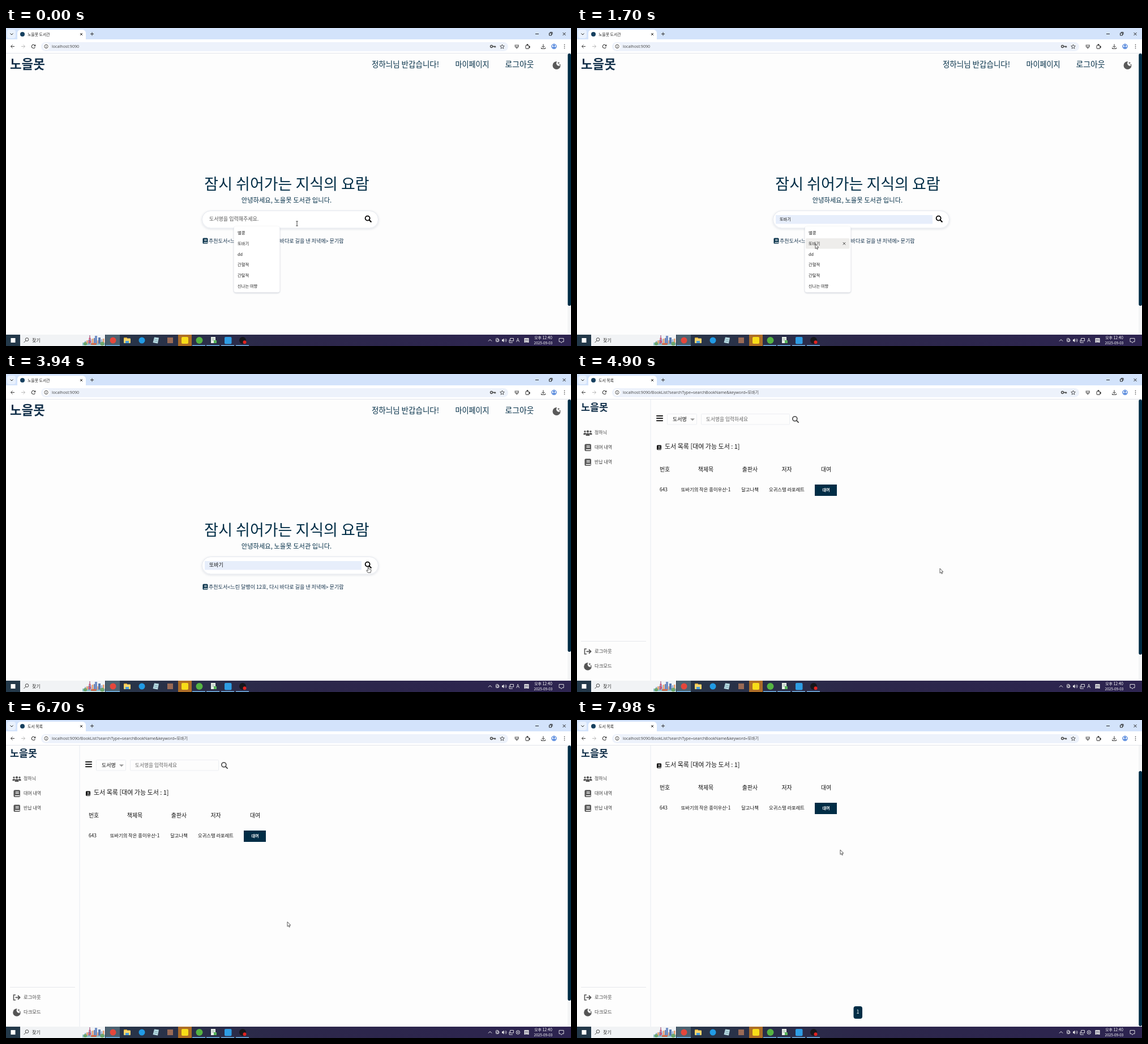
An HTML page with a canvas that plays this animation: 998 by 561 pixels, repeating every 8 s.

```html
<!DOCTYPE html>
<html lang="ko">
<head>
<meta charset="utf-8">
<title>도서관</title>
<style>
  html, body { margin: 0; width: 100%; height: 100%; overflow: hidden; background: #fdfdfd; }
  canvas { display: block; width: 998px; height: 561px; }
</style>
</head>
<body>
<canvas id="stage" width="998" height="561"></canvas>
<script>
const g = document.getElementById('stage').getContext('2d');
const LOOP = 8000, NAVY = '#002d46', GRAY = '#555', PAPER = '#fdfdfd';
const KO = '"Noto Sans CJK KR", "Noto Sans CJK", "Noto Sans", sans-serif';
const UI = '"Open Sans", "Noto Sans CJK KR", "Noto Sans CJK", sans-serif';
const SITE = '노을못', READER = '정하늬', WORD = '또바기';
const OPTIONS = ['별콩', WORD, 'dd', '간혈적', '간탈적', '신나는 여향'];

// Event times in ms
const PICK = 2350, PAGE = 4640, TRAY = 5080, SCROLL = 7420;

// Pointer stops: time, x, y
const PATH = [
  [0, 514, 345], [120, 514, 345], [760, 430, 361], [900, 429, 362],
  [1450, 421, 381], [2480, 421, 381], [3360, 640, 340], [4400, 640, 340],
  [4800, 641, 343], [5900, 641, 343], [6560, 497, 356], [6760, 497, 356],
  [7300, 472, 340], [7600, 472, 340], [7940, 465, 229], [8000, 465, 229]
];

const clamp = v => Math.max(0, Math.min(1, v));
const easeOut = v => 1 - (1 - clamp(v)) ** 2;
const smooth = v => v * v * (3 - 2 * v);

function pointerAt(t) {
  let i = 1;
  while (i < PATH.length - 1 && PATH[i][0] < t) i++;
  const [a, x0, y0] = PATH[i - 1], [b, x1, y1] = PATH[i];
  const k = smooth(clamp((t - a) / (b - a)));
  return [x0 + (x1 - x0) * k, y0 + (y1 - y0) * k];
}

function text(s, x, y, size, color = '#111', weight = 400, align = 'left', font = KO) {
  g.font = `${weight} ${size}px ${font}`;
  g.fillStyle = color;
  g.textAlign = align;
  g.fillText(s, x, y + size * 0.37);
}
const mid = (s, x, y, size, color, weight) => text(s, x, y, size, color, weight, 'center');

function rect(x, y, w, h, color, r = 0) {
  g.fillStyle = color;
  g.beginPath();
  g.roundRect(x, y, w, h, r);
  g.fill();
}
function frame(x, y, w, h, color, r = 0, lw = 1) {
  g.strokeStyle = color;
  g.lineWidth = lw;
  g.beginPath();
  g.roundRect(x, y, w, h, r);
  g.stroke();
}
function dot(x, y, r, color) {
  g.fillStyle = color;
  g.beginPath();
  g.arc(x, y, r, 0, 7);
  g.fill();
}
function ring(x, y, r, color, lw = 1, from = 0, to = 7) {
  g.strokeStyle = color;
  g.lineWidth = lw;
  g.beginPath();
  g.arc(x, y, r, from, to);
  g.stroke();
}
function trace(points) {
  g.beginPath();
  for (let i = 0; i < points.length; i += 2) g.lineTo(points[i], points[i + 1]);
}
function line(points, color, lw = 1) {
  g.strokeStyle = color;
  g.lineWidth = lw;
  trace(points);
  g.stroke();
}
function poly(points, color) {
  g.fillStyle = color;
  trace(points);
  g.closePath();
  g.fill();
}
function cross(x, y, r, color, lw = 1) {
  line([x - r, y - r, x + r, y + r], color, lw);
  line([x + r, y - r, x - r, y + r], color, lw);
}
function lens(x, y, r, color, lw) {
  ring(x, y, r, color, lw);
  line([x + r * 0.7, y + r * 0.7, x + r * 1.7, y + r * 1.7], color, lw * 1.15);
}
function book(x, y, w, h, color) {
  rect(x, y, w, h, color, w * 0.18);
  rect(x + w * 0.28, y + h * 0.22, w * 0.52, h * 0.1, '#fff');
  rect(x + w * 0.28, y + h * 0.42, w * 0.52, h * 0.1, '#fff');
  rect(x + w * 0.2, y + h * 0.74, w * 0.74, h * 0.13, '#fff');
}
function star(x, y, r, color) {
  const p = [];
  for (let i = 0; i < 8; i++) {
    const q = i % 2 ? r * 0.4 : r, a = i * Math.PI / 4;
    p.push(x + q * Math.sin(a), y - q * Math.cos(a));
  }
  poly(p, color);
}
function moon(x, y, r, color) {
  dot(x, y, r, color);
  dot(x + r * 0.62, y - r * 0.55, r * 0.68, PAPER);
  star(x + r * 0.5, y - r * 0.62, r * 0.32, color);
  star(x + r * 0.85, y - r * 0.15, r * 0.26, color);
}

function browser(list) {
  rect(0, 0, 998, 45, '#d3e3fb');
  rect(2, 3, 15, 15, '#e9f1fd', 4);
  line([7.5, 9.5, 10, 12, 12.5, 9.5], '#222');
  rect(20, 3, 121, 22, '#fff', 6);
  rect(0, 20, 998, 25, '#fff');
  dot(29, 11, 4, '#17405f');
  text(list ? '도서 목록' : SITE + ' 도서관', 38, 11, 6.9, '#222');
  cross(133, 11, 2, '#222');
  line([149, 10.5, 155, 10.5], '#333');
  line([152, 7.5, 152, 13.5], '#333');
  line([935, 10.5, 941, 10.5], '#222');
  frame(959.5, 9, 4, 4, '#222');
  line([961, 8, 961, 7.5, 965, 7.5, 965, 11.5], '#222');
  cross(986, 10.5, 2.5, '#222');

  line([15, 32.5, 8.5, 32.5], '#444');
  line([11.5, 29.5, 8.5, 32.5, 11.5, 35.5], '#444');
  line([27, 32.5, 33.5, 32.5], '#bbb');
  line([30.5, 29.5, 33.5, 32.5, 30.5, 35.5], '#bbb');
  ring(48.5, 32.5, 3.1, '#444', 1.1, 0.4, 5.6);
  poly([52.3, 28.8, 52.3, 32.3, 48.9, 32.3], '#444');
  rect(62, 25, 825, 16, '#edf2fb', 8);
  dot(71, 32.5, 6, '#fff');
  ring(71, 32.5, 3.2, '#444', 0.9);
  line([71, 32, 71, 34.5], '#444', 0.9);
  line([71, 30.3, 71, 31.1], '#444', 0.9);
  const path = list ? '/BookList?searchType=searchBookName&keyword=' + WORD : '';
  text('localhost:9090' + path, 81, 32.6, 7.15, '#444', 400, 'left', UI);

  ring(857.5, 32.5, 2, '#444', 1.3);
  line([860, 32.5, 864.5, 32.5, 864.5, 34.5], '#444', 1.3);
  line([862.5, 32.5, 862.5, 34.5], '#444');
  const s = [];
  for (let i = 0; i <= 10; i++) {
    const r = i % 2 ? 1.8 : 4, a = i * Math.PI / 5;
    s.push(876.5 + r * Math.sin(a), 33 - r * Math.cos(a));
  }
  line(s, '#444', 0.9);
  poly([898.5, 29.5, 906, 29.5, 906, 33, 902.2, 37, 898.5, 33], '#888');
  rect(900.5, 31, 3.5, 1.5, '#eee');
  frame(918, 30.5, 6, 6, '#333', 1);
  dot(921, 29.7, 1.4, '#333');
  dot(924.5, 33.5, 1.4, '#333');
  line([949, 28.5, 949, 34], '#333');
  line([946.5, 32, 949, 34.5, 951.5, 32], '#333');
  line([945.5, 34.5, 945.5, 36.5, 952.5, 36.5, 952.5, 34.5], '#333');
  ring(968, 32.5, 4, '#1a5fd0', 1.1);
  dot(968, 31.2, 1.4, '#1a5fd0');
  rect(965.6, 33.4, 4.8, 1.8, '#1a5fd0', 1);
  for (const y of [29.5, 32.5, 35.5]) dot(986.5, y, 0.8, '#333');
  rect(0, 44, 998, 1, '#e2e5ea');
}

function skyline() {
  rect(135, 555, 40, 5, '#8fc3cf');
  for (let i = 0; i < 11; i++) {
    const h = 5 + (i * 7) % 6;
    rect(139 + i * 3.2, 557 - h, 2.6, h, ['#9db7d8', '#e9a06f', '#6f87b7'][i % 3]);
  }
  line([148, 542, 148, 557], '#a2527c', 1.2);
  dot(148, 548, 1.8, '#c95b81');
  dot(148, 553.5, 2.4, '#c95b81');
  rect(157, 543, 4, 14, '#7390c6');
  rect(163, 546, 4, 11, '#587bb0');
  dot(140, 557, 3, '#6da66c');
  dot(170, 557, 3.5, '#6da66c');
  rect(150, 556, 10, 3, '#d56b4c', 1);
}

function taskbar(t) {
  const bg = g.createLinearGradient(0, 0, 998, 0);
  bg.addColorStop(0, '#23394a');
  bg.addColorStop(0.25, '#293348');
  bg.addColorStop(0.5, '#2c274a');
  bg.addColorStop(1, '#2d2450');
  rect(0, 541, 998, 20, bg);
  rect(8.5, 547, 8, 8, '#fff');
  rect(25, 541, 150, 20, '#f1f3f5');
  ring(37, 549.5, 2.8, '#333', 0.9);
  line([35, 551.5, 31.5, 555], '#333', 0.9);
  text('찾기', 46, 551, 8, '#333');
  skyline();

  rect(176, 541, 25, 20, '#4c6271');
  dot(189, 551, 5.5, '#e5473b');
  rect(208, 546, 6, 4, '#e2a92e', 1);
  rect(208, 547.5, 12, 8.5, '#f8d56c', 1);
  rect(211, 552, 6, 4, '#4aa0df');
  dot(240, 551, 5.5, '#219be5');
  poly([262, 545.5, 270, 546.5, 268, 556.5, 259.5, 555], '#b8dce4');
  line([262, 549, 268, 550], '#678f9a', 0.8);
  line([261.5, 552, 267.5, 553], '#678f9a', 0.8);
  rect(285, 546, 10, 10, '#9a6a55');
  rect(304, 541, 24, 20, '#ad6d27');
  rect(310, 545, 12, 12, '#f8dd18', 2);
  dot(341.5, 551, 6, '#55b443');
  rect(362, 545, 8, 11, '#e8f0e8');
  line([363.5, 548, 368.5, 548], '#7a9a88', 0.8);
  line([363.5, 550.5, 368.5, 550.5], '#7a9a88', 0.8);
  rect(367, 551, 5, 5, '#57b45a');
  rect(386, 545, 12.5, 12.5, '#2f9de4', 2);
  dot(418, 551, 6, '#17171b');
  dot(421.5, 554.2, 3, '#e2231f');
  for (const x of [176, 329, 354, 380, 406]) rect(x, 559.5, x === 176 ? 25 : 23, 1.5, '#76b9ed');

  const w = '#eee';
  line([852, 552.5, 855, 549.5, 858, 552.5], w);
  frame(865.5, 547.5, 4, 6, w, 1, 0.9);
  ring(869, 551, 2.2, w, 0.8);
  poly([876, 549.5, 877.5, 549.5, 879.5, 547.5, 879.5, 554.5, 877.5, 552.5, 876, 552.5], w);
  ring(880, 551, 2, w, 0.8, -0.9, 0.9);
  ring(880, 551, 4, w, 0.8, -0.9, 0.9);
  frame(890.5, 547.5, 6, 4.5, w, 0, 0.9);
  line([889, 550, 889, 555, 895, 555], w, 0.9);
  if (t < TRAY) text('A', 904, 551, 9, w, 400, 'center', UI);
  else {
    ring(904.3, 551, 3.2, w, 0.9);
    cross(904.3, 551, 1.5, w, 0.9);
  }
  rect(915.5, 547, 8, 8, '#eee');
  mid('한', 919.5, 551, 7, '#29264a', 500);
  mid('오후 12:40', 949, 546.3, 6.9, '#fff');
  mid('2025-09-03', 949, 555.3, 6.4, '#fff');
  line([977, 547.5, 985, 547.5, 985, 553.5, 982.5, 553.5, 981, 555.5, 979.5, 553.5, 977, 553.5, 977, 547.5], w, 0.9);
}

function scrollbar(y, h) {
  rect(992, 45, 6, 496, '#f4f5f6');
  rect(992.3, y, 5.7, h, NAVY, 2.8);
}

function shadowed(x, y, w, h, r, blur, alpha) {
  g.save();
  g.shadowColor = `rgba(20,40,80,${alpha})`;
  g.shadowBlur = blur;
  g.shadowOffsetY = 1;
  rect(x, y, w, h, '#fff', r);
  g.restore();
}

function home(t, px, py) {
  text(SITE, 7, 63.5, 22.4, '#12304a', 900);
  mid(READER + '님 반갑습니다!', 705.5, 64, 13.5, NAVY, 500);
  mid('마이페이지', 823.5, 64, 13.1, NAVY, 500);
  mid('로그아웃', 907, 64, 13.9, NAVY, 500);
  moon(972.5, 66, 7, '#5a5a5a');
  scrollbar(45, 445);

  mid('잠시 쉬어가는 지식의 요람', 496, 275, 27, NAVY, 500);
  mid(`안녕하세요, ${SITE} 도서관 입니다.`, 495.5, 303.5, 11.3, NAVY, 500);
  shadowed(346, 322.5, 312, 31, 15.5, 4, 0.15);
  frame(346.5, 322.5, 311, 30.5, '#e6e9ef', 15.2);

  const open = t < PICK;
  const over = open && px > 402 && px < 484 && py > 352 ? Math.floor((py - 352) / 18.8) : -1;
  if (over >= 0 || !open) rect(351, 330, 277, 15.5, '#e7eefb');
  if (!open) text(WORD, 359, 336.5, 9, '#111', 500);
  else if (over >= 0) text(OPTIONS[over], 358, 337.5, 7.2, '#111');
  else text('도서명을 입력해주세요.', 359, 336.5, 9, GRAY);
  lens(638.6, 335.6, 4, '#000', 1.8);

  book(347.5, 370.5, 9, 10, NAVY);
  text('추천도서<느린 달팽이 12호, 다시 바다로 길을 낸 저녁에> 문기람', 358, 376, 9.05, '#12304a');

  if (!open) return;
  shadowed(402.5, 350, 81, 116.5, 4, 3, 0.25);
  OPTIONS.forEach((s, i) => {
    const y = 361.5 + i * 18.75;
    if (i === over) {
      rect(404, y - 9.3, 77.5, 18.6, '#eeedeb', 2);
      cross(472, y, 2.2, '#333', 0.9);
    }
    text(s, 409, y, 7.3, '#222');
  });
}

function person(x, y, s, color) {
  dot(x, y - 2.4 * s, 1.9 * s, color);
  rect(x - 3 * s, y + 0.3 * s, 6 * s, 4.2 * s, color, [2.4 * s, 2.4 * s, 0, 0]);
}

function sidebar() {
  rect(129.5, 45, 1, 496, '#e8ebf1');
  text(SITE, 7, 59, 17.4, '#12304a', 900);
  person(14, 103.4, 0.85, GRAY);
  person(24, 103.4, 0.85, GRAY);
  person(19, 104, 1.25, PAPER);
  person(19, 104, 1.1, GRAY);
  book(13.5, 123.5, 11.5, 12.5, GRAY);
  book(13.5, 149.5, 11.5, 12.5, GRAY);
  text(READER, 31, 103, 8, '#444');
  text('대여 내역', 31, 129, 8, '#444');
  text('반납 내역', 31, 155, 8, '#444');
  rect(7, 471, 115, 1, '#e6e8ec');
  line([17, 485, 13.5, 485, 13.5, 494, 17, 494], GRAY, 1.6);
  line([16.5, 489.5, 24, 489.5], GRAY, 1.8);
  line([21, 486, 24.5, 489.5, 21, 493], GRAY, 1.8);
  text('로그아웃', 31, 489, 8.3, '#444');
  moon(19, 516, 6.8, GRAY);
  text('다크모드', 31, 515, 8.3, '#444');
}

function bookList(t) {
  const y = -49 * easeOut((t - SCROLL) / 300);
  const bar = 45 * easeOut((t - SCROLL - 40) / 300);
  sidebar();
  g.save();
  g.beginPath();
  g.rect(131, 45, 861, 496);
  g.clip();
  g.translate(0, y);
  for (const h of [73, 77.3, 81.6]) rect(140, h, 12, 1.7, '#000', 0.8);
  frame(159.5, 70.5, 52, 18.5, '#eceef2', 1);
  text('도서명', 169, 80, 9, '#111', 500);
  poly([200, 78.5, 208, 78.5, 204, 82.5], '#999');
  frame(219.5, 70.5, 156, 18.5, '#eceef2', 1);
  text('도서명을 입력하세요', 228, 79.5, 8.7, '#666');
  lens(384.8, 79, 4, '#444', 1.6);
  book(141, 125.5, 8, 8.5, '#000');
  text('도서 목록 [대여 가능 도서 : 1]', 155, 128, 11, '#111', 500);

  const cols = [155, 227.5, 305.5, 370.5, 440];
  ['번호', '책제목', '출판사', '저자', '대여'].forEach((s, i) => mid(s, cols[i], 168.5, 9.9, '#111', 500));
  rect(420, 195, 39, 20, NAVY);
  const cells = ['643', WORD + '의 작은 종이우산-1', '달고나책', '오귀스탱 라포레트'];
  cells.forEach((s, i) => mid(s, cols[i] - (i ? 0 : 2), 204.2, 8.3, '#111'));
  mid('대여', 440, 204.2, 7, '#fff', 700);
  rect(488.5, 554, 15.5, 22, NAVY, 4);
  mid('1', 496, 564, 9, '#fff', 500);
  g.restore();
  scrollbar(45 + bar, 450);
}

function pointer(t, x, y) {
  if (t < PAGE && y > 322 && y < 350) {
    if (x > 630) return hand(x, y);
    line([x - 1.8, y - 4, x + 1.8, y - 4], '#333', 0.9);
    line([x, y - 4, x, y + 4], '#333', 0.9);
    line([x - 1.8, y + 4, x + 1.8, y + 4], '#333', 0.9);
    return;
  }
  outline([0, 0, 0, 8.3, 1.9, 6.6, 3.2, 9.5, 4.5, 8.9, 3.3, 6.1, 5.8, 6.1, 0, 0], x, y);
}

function hand(x, y) {
  outline([-0.8, 0, 0.8, 0, 0.8, 3.8, 4.6, 4.6, 5, 6, 4, 10.5, -0.8, 10.5, -3.3, 6.8, -2.6, 5.8, -0.8, 7.2, -0.8, 0], x, y);
}

function outline(shape, x, y) {
  const p = shape.map((v, i) => v + (i % 2 ? y : x));
  poly(p, '#fff');
  line(p, '#333', 0.8);
}

function draw(now) {
  const t = now % LOOP, list = t >= PAGE;
  const [px, py] = pointerAt(t);
  rect(0, 0, 998, 561, PAPER);
  if (list) bookList(t);
  else home(t, px, py);
  browser(list);
  taskbar(t);
  pointer(t, px, py);
}

const start = performance.now();
function tick() {
  draw(performance.now() - start);
  requestAnimationFrame(tick);
}
tick();
</script>
</body>
</html>
```
